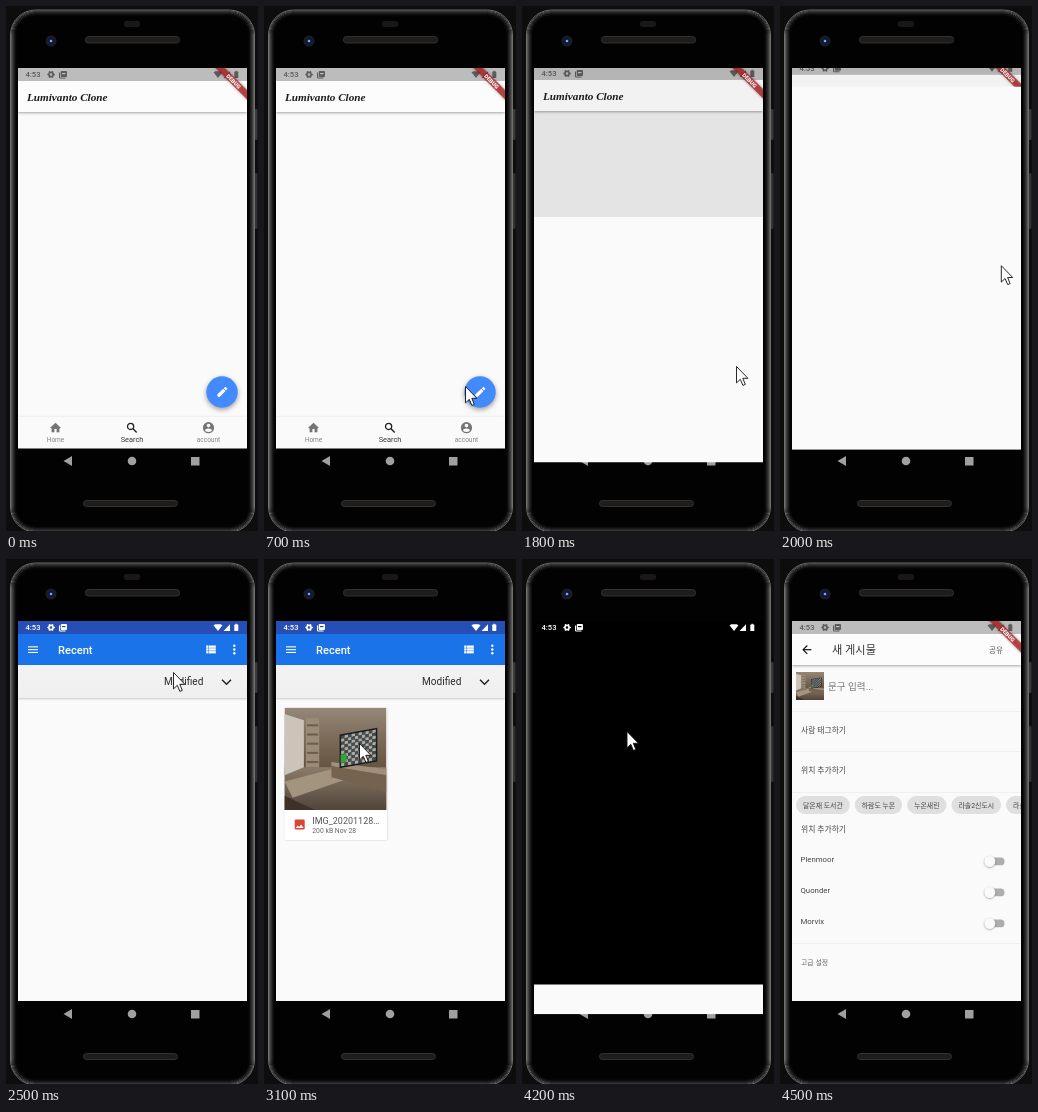
Animation of 252 by 525 pixels, one loop 5500 ms. Source, as an HTML page with a canvas:

```html
<!DOCTYPE html>
<html lang="ko">
<head>
<meta charset="utf-8">
<title>New post demo</title>
<style>
html, body { margin: 0; width: 100%; height: 100%; overflow: hidden; background: #000; }
canvas { display: block; width: 252px; height: 525px; }
</style>
</head>
<body>
<canvas id="stage"></canvas>
<script>
const W = 252, H = 525, LOOP = 5500, STEP = 100;
const LEFT = 12, TOP = 62, WIDE = 229, BOTTOM = 442, TALL = BOTTOM - TOP;
const BAR_TOP = 75, BAR_END = 106, ROW_END = 139;
const SANS = 'Roboto, "Noto Sans CJK KR", "Noto Sans CJK", sans-serif';
const SCRIPT = '"Liberation Serif", "Noto Serif", serif';
const PAPER = '#fafafa', INK = '#444', TAU = Math.PI * 2;

const canvas = document.getElementById('stage');
const ctx = canvas.getContext('2d');
const dpr = window.devicePixelRatio || 1;
canvas.width = W * dpr;
canvas.height = H * dpr;

// Drawing helpers
function rect(x, y, w, h, fill) {
  ctx.fillStyle = fill;
  ctx.fillRect(x, y, w, h);
}
function pill(x, y, w, h, r, fill, stroke) {
  ctx.beginPath();
  ctx.roundRect(x, y, w, h, r);
  if (fill) { ctx.fillStyle = fill; ctx.fill(); }
  if (stroke) { ctx.strokeStyle = stroke; ctx.lineWidth = 1; ctx.stroke(); }
}
function disc(x, y, r, fill, ry = r) {
  ctx.beginPath();
  ctx.ellipse(x, y, r, ry, 0, 0, TAU);
  ctx.fillStyle = fill;
  ctx.fill();
}
function ring(x, y, r, stroke, width) {
  ctx.beginPath();
  ctx.arc(x, y, r, 0, TAU);
  ctx.strokeStyle = stroke;
  ctx.lineWidth = width;
  ctx.stroke();
}
function trace(p) {
  ctx.beginPath();
  for (let i = 0; i < p.length; i += 2) ctx.lineTo(p[i], p[i + 1]);
}
function poly(fill, ...p) {
  trace(p);
  ctx.closePath();
  ctx.fillStyle = fill;
  ctx.fill();
}
function line(stroke, width, ...p) {
  trace(p);
  ctx.strokeStyle = stroke;
  ctx.lineWidth = width;
  ctx.stroke();
}
function text(s, x, y, size, fill, weight = 400, align = 'left', family = SANS) {
  ctx.font = `${weight} ${size}px ${family}`;
  ctx.textAlign = align;
  ctx.fillStyle = fill;
  ctx.fillText(s, x, y);
}
function fade(y0, y1, ...colors) {
  const g = ctx.createLinearGradient(0, y0, 0, y1);
  colors.forEach((c, i) => g.addColorStop(i / (colors.length - 1), c));
  return g;
}
function at(x, y, draw) {
  ctx.save();
  ctx.translate(x, y);
  draw();
  ctx.restore();
}
function clipped(x, y, w, h, draw) {
  ctx.save();
  ctx.beginPath();
  ctx.rect(x, y, w, h);
  ctx.clip();
  draw();
  ctx.restore();
}
function withShadow(alpha, blur, dy, draw) {
  ctx.save();
  ctx.shadowColor = `rgba(0,0,0,${alpha})`;
  ctx.shadowBlur = blur * dpr;
  ctx.shadowOffsetY = dy * dpr;
  draw();
  ctx.restore();
}

// Icons, drawn around their own centre
const icons = {
  home(c) {
    poly(c, -5.6, 0.4, 0, -5, 5.6, 0.4);
    rect(-3.9, 0, 2.8, 4.6, c);
    rect(1.1, 0, 2.8, 4.6, c);
    rect(-3.9, 0, 7.8, 1.3, c);
  },
  search(c) {
    ring(-1.4, -1.3, 3.1, c, 1.3);
    line(c, 1.4, 0.8, 0.9, 4.7, 4.8);
  },
  account(c) {
    disc(0, 0, 5.6, c);
    disc(0, -2.1, 1.8, PAPER);
    disc(0, 2.5, 3.3, PAPER, 1.7);
  },
  edit(c) {
    ctx.rotate(-Math.PI / 4);
    poly(c, -6.2, 0, -4.2, -1.5, 3.2, -1.5, 3.2, 1.5, -4.2, 1.5);
    rect(-5.6, -1.5, 8.8, 3, c);
    pill(4, -1.5, 2.3, 3, 0.6, c);
  },
  back(c) {
    line(c, 1.2, 4.4, 0, -3.7, 0);
    line(c, 1.2, 0.3, -4.2, -3.9, 0, 0.3, 4.2);
  },
  menu(c) {
    for (const y of [-1, 0, 1]) rect(-5, y * 2.8 - 0.6, 10, 1.1, c);
  },
  list(c) {
    for (const y of [-1, 0, 1]) {
      rect(-4.8, y * 2.8 - 1.2, 2.3, 2.3, c);
      rect(-2, y * 2.8 - 1.2, 6.8, 2.3, c);
    }
  },
  more(c) {
    for (const y of [-1, 0, 1]) disc(0, y * 3.8, 1.2, c);
  },
  down(c) {
    line(c, 1.5, -4.5, -2.3, 0, 2.2, 4.5, -2.3);
  },
  image(c) {
    pill(-5, -5, 10, 10, 1.1, c);
    poly('#fff', -3.9, 3.3, -2, 0.8, -0.6, 2.5, 1.4, 0, 3.9, 3.3);
  }
};
function icon(name, x, y, color) {
  at(x, y, () => icons[name](color));
}

function phone() {
  rect(0, 0, W, H, '#0d0d0d');
  pill(249, 103, 2.5, 31, 1, '#3a3a3a');
  pill(249, 167, 2.5, 56, 1, '#333');
  pill(4, 3.5, 245, 523, 25, '#020202');
  for (let i = 0; i < 7; i++) {
    const v = Math.round(112 * (1 - i / 7) ** 1.7);
    pill(4.5 + i, 4 + i, 244 - 2 * i, 522 - 2 * i, 25 - i, null, `rgb(${v},${v},${v})`);
  }
  pill(118, 15, 16, 6, 2, '#191717');
  pill(79.5, 30.5, 94, 6.5, 3, '#1e1d1c', '#33312f');
  pill(77.5, 494.5, 94, 6, 3, '#1e1d1c', '#33312f');
  disc(45, 35, 5.5, '#1b1d24');
  disc(45, 35, 3.4, '#0d1a40');
  disc(45, 35, 1.3, '#86a4d8');
}
function navButtons() {
  const gray = '#a0a0a0';
  poly(gray, 57.5, 455, 66, 450, 66, 460);
  disc(126, 455, 4.3, gray);
  rect(185, 451, 8.5, 8.5, gray);
}

function status(bg, fg) {
  rect(LEFT, TOP, WIDE, BAR_TOP - TOP, bg);
  text('4:53', 19.5, 71.3, 7.6, fg, 500);
  at(45, 68.5, () => {
    ring(0, 0, 2.1, fg, 1.6);
    for (let a = 0; a < TAU; a += TAU / 6) disc(3 * Math.cos(a), 3 * Math.sin(a), 0.8, fg);
  });
  line(fg, 1, 53.5, 66.5, 53.5, 72, 59.5, 72);
  pill(54.7, 65, 6.3, 6, 1, fg);
  rect(56, 67, 3.5, 1.2, bg);
  poly(fg, 207.5, 66.3, 209.5, 65.2, 214.5, 65.2, 216.5, 66.3, 212, 72);
  poly(fg, 217.5, 72, 224, 72, 224, 65.2);
  pill(228.3, 65.6, 4, 6.4, 0.6, fg);
  rect(229.4, 64.8, 1.8, 1, fg);
}
function ribbon() {
  at(LEFT + WIDE, TOP, () => {
    ctx.rotate(Math.PI / 4);
    withShadow(0.5, 3, 0, () => rect(-24, 15.6, 48, 6.7, 'rgba(183,28,28,.72)'));
    text('DEBUG', 0, 21, 5.6, '#fff', 900, 'center');
  });
}
// Light page with status bar, app bar and ribbon
function page(content) {
  rect(LEFT, TOP, WIDE, TALL, PAPER);
  withShadow(0.35, 2.5, 1, () => rect(LEFT, BAR_TOP, WIDE, BAR_END - BAR_TOP, '#fcfcfc'));
  status('#bcbcbc', '#5c5c5c');
  content();
  ribbon();
}

function fab(press) {
  const r = 15.7;
  at(216, 386, () => {
    withShadow(0.38, 5 + 3 * press, 2 + 1.5 * press, () => disc(0, 0, r, '#448aff'));
    icon('edit', 0, 0.2, '#fff');
    disc(0, 0, r * press, 'rgba(255,255,255,.14)');
  });
}
function tabs() {
  withShadow(0.2, 2, 0, () => rect(LEFT, 410.5, WIDE, 32, PAPER));
  ['home', 'search', 'account'].forEach((name, i) => {
    const x = 49.5 + 76.5 * i, on = name === 'search';
    icon(name, x, 421.7, on ? '#222' : '#757575');
    text(i < 2 ? name[0].toUpperCase() + name.slice(1) : name, x, 436,
      on ? 7.4 : 6.5, on ? '#333' : '#858585', 400, 'center');
  });
}
function homeScreen(press, controls) {
  page(() => {
    text('Lumivanto Clone', 21, 94.5, 11.2, '#1c1c1c', 'italic 700', 'left', SCRIPT);
    if (!controls) return;
    tabs();
    fab(press);
  });
}

// Room with a bright window, a low cabinet and a chequered screen
function photo(x, y, size) {
  at(x, y, () => {
    ctx.scale(size / 100, size / 100);
    clipped(0, 0, 100, 100, () => {
      rect(0, 0, 100, 100, fade(0, 60, '#968777', '#7d6b59', '#655342'));
      rect(0, 58, 100, 42, fade(58, 100, '#8b7b68', '#51443a'));
      poly('#cbc4b8', 0, 6, 19, 12, 19, 58, 0, 66);
      rect(21, 10, 13, 48, '#9a8b79');
      for (let s = 0; s < 5; s++) rect(22, 16 + 9 * s, 11, 2, '#6d5c4b');
      poly('#a39480', 0, 72, 46, 60, 60, 70, 8, 88);
      poly('#3d3128', 0, 86, 30, 100, 0, 100);
      poly('#a08f79', 46, 53, 100, 60, 100, 66, 46, 57);
      poly('#75634f', 46, 57, 100, 66, 100, 82, 46, 68);
      at(54, 26, () => {
        ctx.transform(1, -0.18, 0, 1, 0, 0);
        rect(0, 0, 37, 33, '#1c1d1d');
        const n = 10, w = 3.4, h = 3;
        for (let i = 0; i < n * n; i++) {
          const c = i % n, r = Math.floor(i / n);
          rect(1.5 + c * w, 1.5 + r * h, w, h, (r + c) % 2 ? '#a9adaa' : '#474c4a');
        }
        rect(1, 20, 6, 8, '#31a43a');
      });
    });
  });
}

// level: 0 empty window, 1 toolbar, 2 toolbar and file card
function picker(level) {
  rect(LEFT, TOP, WIDE, TALL, PAPER);
  if (!level) return;
  withShadow(0.2, 2, 0.5, () =>
    rect(LEFT, BAR_END, WIDE, ROW_END - BAR_END, fade(BAR_END, ROW_END, '#f3f3f3', '#efefef')));
  rect(LEFT, BAR_TOP, WIDE, BAR_END - BAR_TOP, '#1a73e8');
  status('#264fb5', '#fff');
  icon('menu', 27, 90.7, '#fff');
  text('Recent', 52, 94.7, 11.1, '#fff', 500);
  icon('list', 205, 90.5, '#fff');
  icon('more', 228.3, 90.5, '#fff');
  text('Modified', 158, 126.4, 10.1, '#2b2b2b');
  icon('down', 220.5, 123, '#222');
  if (level < 2) return;
  withShadow(0.2, 2, 0.3, () => rect(20.5, 149, 102.5, 132, '#fff'));
  photo(20.5, 149, 102);
  icon('image', 35.7, 265.6, '#db4437');
  text('IMG_20201128…', 48.3, 264.7, 9, '#555');
  text('200 kB Nov 28', 48.3, 274.2, 6.8, '#666');
}

function chips(labels) {
  let x = 16;
  for (const label of labels) {
    ctx.font = `400 6.9px ${SANS}`;
    const w = ctx.measureText(label).width + 14;
    pill(x, 237, w, 18, 9, '#dfdfdf');
    text(label, x + 7, 248.8, 6.9, INK);
    x += w + 5;
  }
}
function toggle(label, y) {
  text(label, 20.5, y + 0.5, 7.8, INK);
  pill(205, y - 4, 19.5, 7.8, 3.9, '#adadad');
  withShadow(0.4, 2, 0.7, () => disc(209.8, y, 5.5, PAPER));
}
function postScreen() {
  page(() => {
    icon('back', 27, 90.7, '#111');
    text('새 게시물', 52, 95, 11.2, '#333');
    text('공유', 209, 93.7, 7.6, '#555');
    photo(16, 113, 28);
    text('문구 입력...', 48, 131, 9.6, '#777');
    for (const y of [152, 192, 233, 384]) rect(LEFT, y, WIDE, 1, '#f0f0f0');
    ['사람 태그하기', '위치 추가하기'].forEach((s, i) => text(s, 21, 174.3 + 40 * i, 7.8, INK));
    chips(['달온재 도서관', '하람도 누온', '누온새린', '라솔2신도시', '라솔 하늘']);
    text('위치 추가하기', 21, 273.3, 7.8, INK);
    ['Plenmoor', 'Quonder', 'Morvix'].forEach((s, i) => toggle(s, 302.5 + 31 * i));
    text('고급 설정', 21, 406, 6.9, '#666');
  });
}

// Motion
const clamp = v => Math.min(1, Math.max(0, v));
const progress = (t, start, ms) => clamp((t - start) / ms);
const easeOut = p => 1 - (1 - p) ** 3;
const mix = (a, b, k) => a + (b - a) * k;

// Each glide: start, duration, and where the pointer tip ends
const GLIDES = [
  [300, 400, 201, 380], [800, 200, 210.5, 374], [1700, 100, 214, 360], [1800, 500, 231, 108],
  [2300, 200, 167, 113], [2500, 400, 81, 195], [2900, 200, 95, 184], [3600, 100, 104.5, 172]
];
function pointer(t) {
  if (t < 300 || t >= 4500) return;
  let x = 166, y = 303;
  for (const [start, ms, toX, toY] of GLIDES) {
    const k = progress(t, start, ms);
    x = mix(x, toX, k);
    y = mix(y, toY, k);
  }
  at(x + 0.5, y + 0.5, () => {
    poly('#fff', 0, 0, 0, 16.4, 3.8, 12.8, 6.4, 18.9, 8.8, 17.9, 6.3, 11.8, 11.4, 11.8);
    ctx.strokeStyle = '#111';
    ctx.lineWidth = 0.9;
    ctx.stroke();
  });
}

// Picker window lowered by dy and cut off above `top`
function slidingPicker(top, dy, level) {
  clipped(LEFT, top, WIDE, BOTTOM + dy - top, () => at(0, dy, () => picker(level)));
}
function opening(t) {
  const k = easeOut(progress(t, 1800, 400));
  at(0, mix(-1, -7, k), () => homeScreen(0, false));
  rect(LEFT, TOP, WIDE, TALL, 'rgba(0,0,0,.04)');
  rect(LEFT, BAR_END - 1, WIDE, BOTTOM - BAR_END, 'rgba(0,0,0,.05)');
  slidingPicker(mix(211, TOP, k), mix(14.5, 0, k), t < 2100 ? 0 : 1);
}
function closing(t) {
  const k = easeOut(progress(t, 4000, 400));
  rect(LEFT, TOP, WIDE, TALL, '#000');
  status('#000', '#fff');
  slidingPicker(mix(204, 457, k), mix(1.5, 15, k), 2);
}
function screen(t) {
  if (t < 1800) homeScreen(progress(t, 800, 500), true);
  else if (t < 2200) opening(t);
  else if (t < 4000) picker(t < 2600 ? 1 : 2);
  else if (t < 4500) closing(t);
  else postScreen();
}

function render(now) {
  const t = Math.floor((now % LOOP) / STEP) * STEP;
  ctx.setTransform(dpr, 0, 0, dpr, 0, 0);
  phone();
  navButtons();
  clipped(LEFT, TOP, WIDE, 408, () => screen(t));
  pointer(t);
}

const start = performance.now();
function tick() {
  render(performance.now() - start);
  requestAnimationFrame(tick);
}
tick();
</script>
</body>
</html>
```
